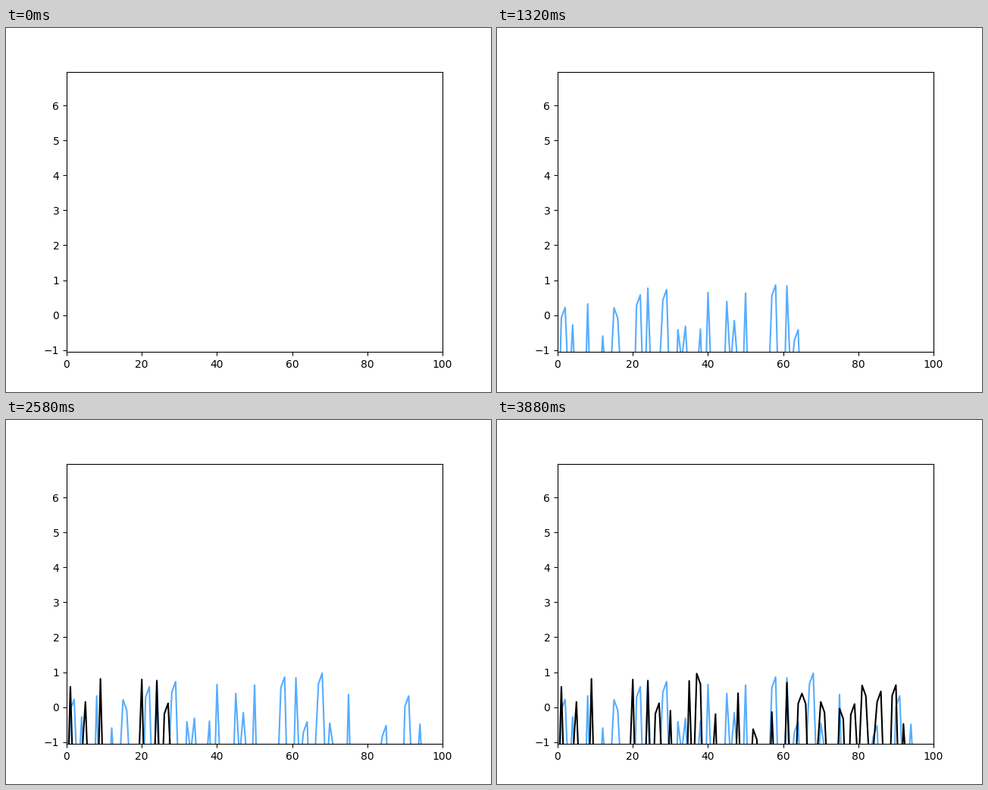
Recreate the animation shown at these times as a matplotlib script. Size 640 by 480 pixels, loop 4000 ms.

```python
import numpy as np
import matplotlib.pyplot as plt
from matplotlib.animation import FuncAnimation

N = 100
SHOULDER = 0.3  # drop from a crest to the sample beside it

# Crests as (x, height) or (x, height, side of its shoulder).
BLUE_CRESTS = [
    (2, 0.22, -1), (4, -0.28), (8, 0.32), (12, -0.6), (15, 0.21, 1),
    (22, 0.58, -1), (24, 0.77), (29, 0.73, -1), (32, -0.42), (34, -0.32),
    (38, -0.4), (40, 0.65), (45, 0.39), (47, -0.16), (50, 0.63),
    (58, 0.86, -1), (61, 0.84), (64, -0.42, -1), (68, 0.97, -1),
    (70, -0.46), (75, 0.36), (85, -0.53, -1), (91, 0.32, -1), (94, -0.49),
]
BLACK_CRESTS = [
    (1, 0.58), (5, 0.15), (9, 0.81), (20, 0.79), (24, 0.75), (27, 0.11, -1),
    (30, -0.1), (35, 0.75), (37, 0.96, 1), (42, -0.2), (48, 0.4),
    (52, -0.63, 1), (57, -0.14), (61, 0.7), (64, 0.1), (65, 0.39, 1),
    (70, 0.15, 1), (75, -0.04, 1), (79, 0.09, -1), (81, 0.62, 1),
    (86, 0.45, -1), (90, 0.63, -1), (92, -0.48),
]


def series(crests, seed):
    """Random troughs below the axis with the crests set on top."""
    y = np.random.default_rng(seed).uniform(-4, -1.1, N)
    for x, height, *side in crests:
        y[x] = height
        for step in side:
            y[x + step] = height - SHOULDER
    return y


x = np.arange(N)
blue, black = series(BLUE_CRESTS, 3), series(BLACK_CRESTS, 8)

fig, ax = plt.subplots(figsize=(6.4, 4.8), dpi=100)
ax.set_xlim(0, 100)
ax.set_ylim(-1.0547, 6.966)
blue_line, = ax.plot([], [], color="#56acff", lw=1.5)
black_line, = ax.plot([], [], color="black", lw=1.5)


def reveal(line, y, count):
    count = min(max(count, 0), N)
    line.set_data(x[:count], y[:count])


def update(frame):
    reveal(blue_line, blue, frame)
    reveal(black_line, black, frame - N)
    return blue_line, black_line


anim = FuncAnimation(fig, update, frames=2 * N, interval=20,
                     init_func=lambda: update(0), repeat=True)
plt.show()
```
